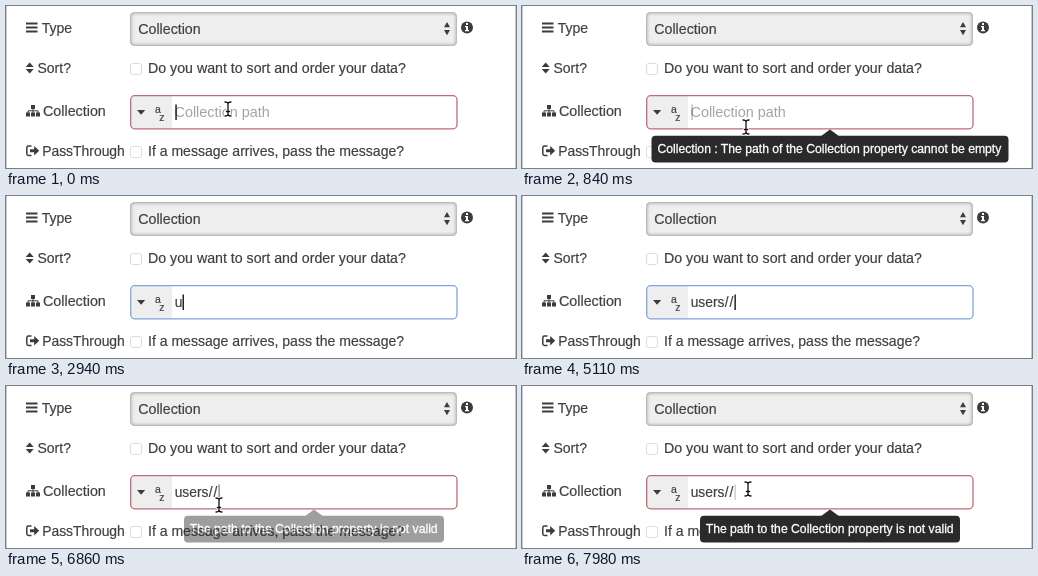
Write an HTML page that moves like this. It is 510 px wide and 162 px high and loops after 8 s.

```html
<!DOCTYPE html>
<html lang="en">
<head>
<meta charset="utf-8">
<title>Collection form</title>
<style>
  html, body { margin: 0; width: 100%; height: 100%; overflow: hidden; background: #fff; }
  svg { display: block; width: 510px; height: 162px; }
  text { font: 14px "Liberation Sans", Arial, sans-serif; fill: #404040; stroke: #404040; stroke-width: .2; white-space: pre; }
  .tip { fill: #2a2a2a; }
  .tip text { font-size: 12.2px; fill: #fff; stroke: #fff; stroke-width: .3; }
  .icon { fill: #3c3c3c; }
  .line { fill: none; stroke: #3c3c3c; }
  .check { fill: #fff; stroke: #dcdcdc; }
  .value { font-size: 13.8px; }
  .small { font-size: 10.5px; }
</style>
</head>
<body>
<svg viewBox="0 0 510 162">
  <defs>
    <clipPath id="face"><rect x="124" y="6" width="327" height="34" rx="4.5"/></clipPath>
    <filter id="soft" x="-5%" y="-30%" width="110%" height="160%"><feGaussianBlur stdDeviation="1.6"/></filter>
    <path id="beamShape" d="M-3-7Q0-7 0-5Q0-7 3-7M0-5V5M-3 7Q0 7 0 5Q0 7 3 7M-1.6 2.5h3.2"/>
    <path id="tipArrow" d="M298.5 130.500L308 123.500l9.500 7z"/>
  </defs>
  <rect width="510" height="162" fill="#fff"/>
  <path d="M.5 0V162M509.5 0V162" stroke="#c8c8c8"/>

  <!-- Type -->
  <path class="icon" d="M20 16.5h11.500v2H20zM20 20.5h11.500v2H20zM20 24.500h11.500v2H20z"/>
  <text x="35.7" y="26.700">Type</text>
  <g clip-path="url(#face)">
    <rect x="124" y="6" width="327" height="34" fill="#eee"/>
    <rect x="124" y="6" width="327" height="34" rx="4.500" fill="none" stroke="#000" stroke-opacity=".25" stroke-width="3" filter="url(#soft)"/>
  </g>
  <rect x="124.500" y="6.500" width="326" height="33" rx="4" fill="none" stroke="#bcbcbc"/>
  <text x="132.300" y="27.700" style="font-size:14.200px">Collection</text>
  <path class="icon" d="M438 21.300l3-5.300 3 5.300zM438 24l3 5.300 3-5.300z"/>
  <circle class="icon" cx="461" cy="21.500" r="6"/>
  <path fill="#fff" d="M460 17h2v2h-2zM459 20h3v4h1v1.300h-4V24h1v-2.700h-1z"/>

  <!-- Sort -->
  <path class="icon" d="M19.700 61l4-4.500 4 4.500zM19.700 63l4 4.500 4-4.500z"/>
  <text x="31.500" y="66.800">Sort?</text>
  <rect class="check" x="124.500" y="57.500" width="11" height="11" rx="2"/>
  <text x="142" y="66.800" style="font-size:14.200px">Do you want to sort and order your data?</text>

  <!-- Collection -->
  <path class="icon" d="M25 99h4v4h-4zM20 106.500h4v4h-4zM25 106.500h4v4h-4zM30 106.500h4v4h-4z"/>
  <path class="line" d="M27 102v5M22 107v-2.200h10v2.200"/>
  <text x="37" y="109.700" style="font-size:14.300px">Collection</text>
  <path fill="#eee" d="M129 90h37v33h-37a4 4 0 0 1-4-4V94a4 4 0 0 1 4-4z"/>
  <rect id="border" x="124.700" y="89.700" width="326.300" height="33.100" rx="4" fill="none" stroke-width="1.300"/>
  <path class="icon" d="M131 104h8.200l-4.100 4.800z"/>
  <text class="small" x="149" y="106.500">a</text>
  <text class="small" x="153.300" y="114.500">z</text>
  <text id="hint" x="168.500" y="111" style="font-size:14.400px;fill:#a3a3a3;stroke:none">Collection path</text>
  <text id="word" class="value" x="168.700" y="111"></text>
  <text id="slashes" class="value" x="202.700" y="111" letter-spacing="1.100"></text>
  <rect id="caret" y="98.500" width="1.500" height="15.500" fill="#222"/>

  <!-- PassThrough -->
  <path class="line" stroke-width="1.500" d="M25.500 140H22.500q-1.700 0-1.700 1.700v6.100q0 1.700 1.700 1.700h3"/>
  <path class="icon" d="M24 143.300h4.200V140l5 4.800-5 4.800v-3.300H24z"/>
  <text x="36.200" y="149.800" style="font-size:13.900px">PassThrough</text>
  <rect class="check" x="124.500" y="140.500" width="11" height="11" rx="2"/>
  <text x="142" y="149.800" style="font-size:14.050px">If a message arrives, pass the message?</text>

  <g id="emptyTip" class="tip">
    <use href="#tipArrow"/>
    <rect x="129.500" y="129.700" width="357" height="26.800" rx="4"/>
    <text x="135.400" y="147.100">Collection : The path of the Collection property cannot be empty</text>
  </g>
  <g id="invalidTip" class="tip">
    <use href="#tipArrow"/>
    <rect x="178" y="129.700" width="260" height="26.800" rx="4"/>
    <text x="183.700" y="147.100">The path to the Collection property is not valid</text>
  </g>

  <g id="beam" fill="none" stroke-linecap="round">
    <use href="#beamShape" stroke="#fff" stroke-width="2.800"/>
    <use href="#beamShape" stroke="#111" stroke-width="1.300"/>
  </g>
  <path id="arrow" d="M0 0V13l3-2.700 2 4.700 2.300-1-2-4.500H9.500z" fill="#111" stroke="#fff"/>
</svg>
<script>
const LOOP = 8000, STEP = 70;
const $ = id => document.getElementById(id);

// [time, characters typed]
const typing = [[0, 0], [2870, 1], [3080, 2], [3360, 3], [3570, 4], [3990, 5], [4900, 6], [5110, 7]];
const caretX = [169.3, 176.5, 183.5, 191, 195.7, 202.3, 207.4, 212.4];
const blinkStarts = [-70, 2870, 3080, 3360, 3570, 3990, 4900, 5110, 5250];

// [time, x, y]
const firstPath = [[210, 222, 103], [630, 224, 121]];
const secondPath = [[5670, 225, 135.5], [6090, 211, 117], [6300, 213, 118],
  [6370, 213, 118], [6440, 213, 119], [7420, 213, 119], [7700, 226, 103]];

const TYPE_START = 2870, BLUE_END = 5250;

function along(path, t) {
  if (t <= path[0][0]) return path[0].slice(1);
  for (let i = 1; i < path.length; i++) {
    const [t0, x0, y0] = path[i - 1], [t1, x1, y1] = path[i];
    if (t <= t1) {
      const p = (t - t0) / (t1 - t0), e = p * p * (3 - 2 * p);
      return [x0 + (x1 - x0) * e, y0 + (y1 - y0) * e];
    }
  }
  return path[path.length - 1].slice(1);
}

function caretAlpha(t) {
  const start = blinkStarts.filter(s => s <= t).pop();
  const d = (t - start) % 1050;
  if (d < 560) return 1;
  if (d < 700) return d < 630 ? 0.5 : 0.22;
  if (d < 910) return 0;
  return d < 980 ? 0.3 : 0.65;
}

const fadeIn = (t, start) => t < start ? 0 : Math.min(1, 0.45 + (t - start) / 250);

function show(el, on) { el.style.display = on ? "" : "none"; }

function draw(time) {
  const t = Math.floor(time / STEP) * STEP;
  const count = typing.filter(k => k[0] <= t).pop()[1];
  show($("hint"), count === 0);
  $("word").textContent = "users".slice(0, count);
  $("slashes").textContent = "//".slice(0, Math.max(0, count - 5));
  $("caret").setAttribute("x", caretX[count]);
  $("caret").setAttribute("opacity", caretAlpha(t));

  const blue = t >= TYPE_START && t < BLUE_END;
  $("border").setAttribute("stroke", blue ? "#7fa6dc" : "#bd6d75");

  const empty = t < TYPE_START ? fadeIn(t, 700) : t < TYPE_START + STEP ? 0.5 : 0;
  $("emptyTip").setAttribute("opacity", empty);
  $("invalidTip").setAttribute("opacity", fadeIn(t, 6860));

  const early = t < TYPE_START;
  const visible = early || t >= secondPath[0][0];
  const [x, y] = along(early ? firstPath : secondPath, t);
  const overInput = y < 123;
  show($("beam"), visible && overInput);
  show($("arrow"), visible && !overInput);
  for (const id of ["beam", "arrow"]) $(id).setAttribute("transform", `translate(${x} ${y})`);
}

const began = performance.now();
function tick() {
  draw((performance.now() - began) % LOOP);
  requestAnimationFrame(tick);
}
tick();
</script>
</body>
</html>
```
